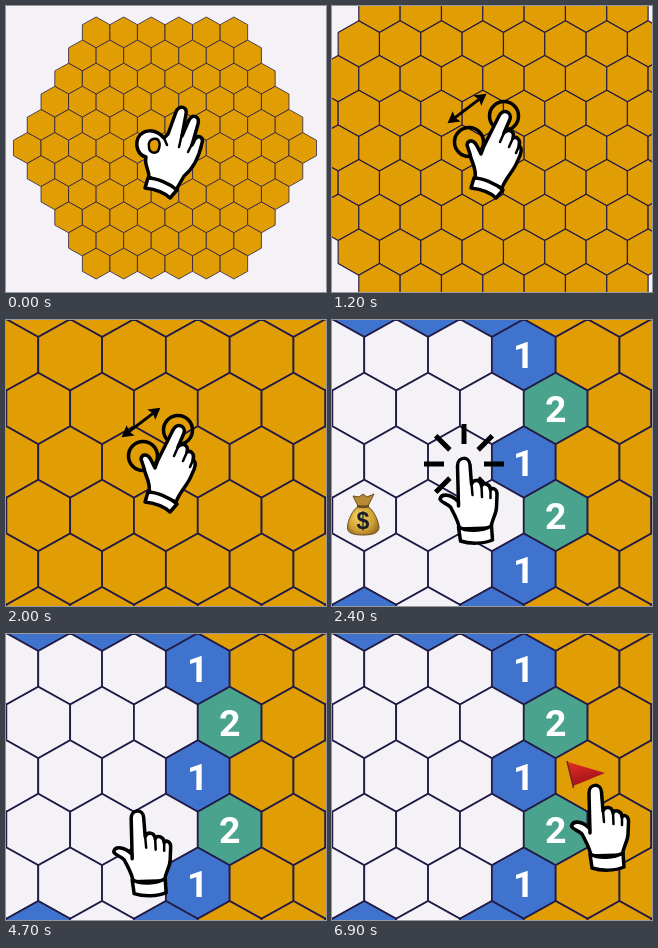
An HTML page with a canvas for the animation above (7000 ms loop, 320 by 286 pixels).

```html
<!DOCTYPE html>
<html lang="en">
<head>
<meta charset="utf-8">
<title>Hexagon minefield tutorial</title>
<style>
  html, body { margin: 0; width: 100%; height: 100%; overflow: hidden; background: #f4f2f6; }
  canvas { display: block; }
</style>
</head>
<body>
<canvas id="stage" width="320" height="286"></canvas>
<script>
const ctx = document.getElementById('stage').getContext('2d');
const LOOP = 7000, STEP = 100;
const PAPER = '#f4f2f6', ORANGE = '#e19d04', BLUE = '#3f73cd', GREEN = '#4aa38c', LINE = '#221b46';
const CELL_W = 27.55, ROW_H = 23.12, RADIUS = ROW_H / 1.5, MAX_ZOOM = 2.316;

const clamp = v => Math.max(0, Math.min(1, v));
const progress = (t, from, to) => clamp((t - from) / (to - from));
const mix = (a, b, p) => a + (b - a) * p;
const during = (t, from, to) => t >= from && t < to;

// Hands: body outline, finger creases, cuff
const POINTER = {
  body: new Path2D('M-5 49 L-6 9 C-6 -1 6 -1 6.5 8 L8 27 C10 22 17 22 18 29 C20 25 27 27 27 33 C29 30 34 32 33.5 38 L33 50 C33 58 28 62 27.5 71 L-4 72 C-5 64 -9 58 -13 50 C-17 46 -22 46 -23.5 42 C-22 36 -12 37 -5 45 Z'),
  creases: new Path2D('M8 27 L9 38 M18 29 L18.5 40 M27 33 L27 41'),
  cuff: new Path2D('M-5 70 C4 75 19 74 28 69 L29 83 C20 87 6 87 -3 84 Z')
};
const WRIST = new Path2D('M142 172 C150 172 163 177 171 184 L164 192 C158 186 147 183 139 182 Z');
const SPREAD = {
  body: new Path2D('M152 140 L167 110 C171 102 180 106 178 113 L172 127 C176 122 183 125 181 132 C185 130 189 134 187 140 C191 142 189 148 186 154 C182 165 174 171 170 182 L143 172 C145 162 139 156 138 148 L135 139 C136 133 142 134 145 140 L149 148 Z'),
  creases: new Path2D('M172 127 L168 136 M181 132 L177 141 M187 140 L184 147'),
  cuff: WRIST
};
const PINCHED = {
  body: new Path2D('M143 171 C143 163 138 159 140 151 C132 149 129 140 132 132 C137 123 149 122 158 132 L162 128 L170 106 C173 98 182 101 180 108 L176 130 L183 114 C187 107 194 111 192 118 L186 139 L189 133 C193 128 198 132 196 137 C193 151 188 162 178 170 L170 184 Z'),
  creases: new Path2D('M176 128 L173 141 M186 138 L182 146 M158 132 L161 139'),
  hole: new Path2D('M147 133 C154 131 155 139 152 145 C149 148 143 147 143 141 C142 137 144 134 147 133 Z'),
  cuff: WRIST
};

function drawHand(hand, x = 0, y = 0) {
  ctx.save();
  ctx.translate(x, y);
  ctx.lineWidth = 3.5;
  ctx.lineJoin = ctx.lineCap = 'round';
  ctx.strokeStyle = '#000';
  for (const part of [hand.body, hand.cuff]) {
    ctx.fillStyle = '#fff';
    ctx.fill(part);
    ctx.stroke(part);
  }
  ctx.lineWidth = 2.5;
  ctx.stroke(hand.creases);
  if (hand.hole) {
    ctx.fillStyle = ORANGE;
    ctx.fill(hand.hole);
    ctx.stroke(hand.hole);
  }
  ctx.restore();
}

function polygon(points) {
  ctx.beginPath();
  points.forEach(([x, y]) => ctx.lineTo(x, y));
  ctx.closePath();
}

// Columns are measured in cell widths from the board centre
function cellState(row, col) {
  const r = Math.abs(row);
  const edge = r % 2 ? 0.5 : 0;
  if (r === 3) {
    if (col > 0) return { fill: ORANGE };
    return { fill: row > 0 && col === -1.5 ? PAPER : BLUE };
  }
  if (r > 3 || col > edge) return { fill: ORANGE };
  if (col < edge) return { fill: PAPER };
  return r % 2 ? { fill: GREEN, label: '2' } : { fill: BLUE, label: '1' };
}

function drawBoard(zoom, revealed) {
  const cx = 159 + 24.9 * (zoom - 1), cy = 142;
  const half = CELL_W * zoom / 2, radius = RADIUS * zoom;
  ctx.strokeStyle = LINE;
  ctx.lineWidth = 0.76 * zoom;
  ctx.lineJoin = 'round';
  ctx.font = 'bold 37.5px Roboto, Arial, sans-serif';
  ctx.textAlign = 'center';
  for (let row = -5; row <= 5; row++) {
    const count = 11 - Math.abs(row);
    for (let i = 0; i < count; i++) {
      const col = i - (count - 1) / 2;
      const x = cx + col * half * 2, y = cy + row * ROW_H * zoom;
      const { fill, label } = revealed ? cellState(row, col) : { fill: ORANGE };
      polygon([[x, y - radius], [x + half, y - radius / 2], [x + half, y + radius / 2],
        [x, y + radius], [x - half, y + radius / 2], [x - half, y - radius / 2]]);
      ctx.fillStyle = fill;
      ctx.fill();
      ctx.stroke();
      if (label) {
        ctx.fillStyle = '#fff';
        ctx.fillText(label, x, y + 13.5);
      }
    }
  }
}

function drawZoomMarks() {
  ctx.strokeStyle = ctx.fillStyle = '#000';
  ctx.lineWidth = 3.5;
  for (const [x, y] of [[172, 110], [137, 136]]) {
    ctx.beginPath();
    ctx.arc(x, y, 14.5, 0, Math.PI * 2);
    ctx.stroke();
  }
  ctx.save();
  ctx.translate(135, 102.5);
  ctx.rotate(Math.atan2(-29, 38));
  ctx.lineWidth = 3;
  ctx.beginPath();
  ctx.moveTo(-18, 0);
  ctx.lineTo(18, 0);
  ctx.stroke();
  for (const side of [-1, 1]) {
    polygon([[side * 24.5, 0], [side * 13, -6.5], [side * 15, 0], [side * 13, 6.5]]);
    ctx.fill();
  }
  ctx.restore();
}

function drawRays(x, y) {
  ctx.strokeStyle = '#000';
  ctx.lineWidth = 5;
  ctx.lineCap = 'butt';
  ctx.beginPath();
  for (let i = 0; i < 8; i++) {
    const dx = Math.cos(i * Math.PI / 4), dy = Math.sin(i * Math.PI / 4);
    ctx.moveTo(x + dx * 20, y + dy * 20);
    ctx.lineTo(x + dx * 40, y + dy * 40);
  }
  ctx.stroke();
}

function drawBag() {
  const shade = ctx.createRadialGradient(26, 196, 2, 31, 200, 20);
  shade.addColorStop(0, '#f0cc5c');
  shade.addColorStop(0.6, '#cfa033');
  shade.addColorStop(1, '#80581c');
  const sack = new Path2D('M27 186 C20 190 16 200 15.5 207 C15 213 21 215 31 215 C41 215 47 213 47 207 C46 200 42 190 35 186 Z');
  const neck = new Path2D('M26 186 L21 176 L27 177 L31 174 L35 177 L42 174 L36 186 Z');
  ctx.lineWidth = 1;
  ctx.strokeStyle = '#6b4c1c';
  ctx.fillStyle = shade;
  ctx.fill(sack);
  ctx.stroke(sack);
  ctx.fillStyle = '#b98a35';
  ctx.fill(neck);
  ctx.stroke(neck);
  ctx.lineWidth = 2.5;
  ctx.stroke(new Path2D('M25 186 Q31 188 37 186'));
  ctx.fillStyle = '#17202a';
  ctx.font = 'bold 23px "Liberation Sans", Arial, sans-serif';
  ctx.fillText('$', 31, 209);
}

function drawFlag() {
  const red = ctx.createLinearGradient(240, 130, 246, 152);
  red.addColorStop(0, '#dc2a24');
  red.addColorStop(1, '#a3131a');
  ctx.fillStyle = red;
  polygon([[236, 128], [273, 139], [241, 152]]);
  ctx.fill();
  ctx.strokeStyle = '#6f2420';
  ctx.lineWidth = 1.5;
  ctx.stroke(new Path2D('M235 127 L241.5 154'));
}

// Pointer legs: start, end, from x, y, to x, y
const LEGS = [
  [2000, 2300, 173, 108, 131.5, 137],
  [3000, 3800, 131.5, 137, 37, 194],
  [4200, 5400, 37, 194, 263, 150]
];

function pointerAt(t) {
  const [start, end, x0, y0, x1, y1] = LEGS.filter(leg => t >= leg[0]).pop();
  const p = progress(t, start, end);
  return [mix(x0, x1, p), mix(y0, y1, p)];
}

function draw(t) {
  ctx.fillStyle = PAPER;
  ctx.fillRect(0, 0, 320, 286);
  const revealed = t >= 2400;
  drawBoard(MAX_ZOOM ** progress(t, 495, 1955), revealed);
  if (revealed && t < 4300) drawBag();
  if (t >= 6000) drawFlag();

  if (t < 400) drawHand(PINCHED);
  else if (t < 2100) {
    drawZoomMarks();
    drawHand(SPREAD);
  } else {
    const [x, y] = pointerAt(t);
    if (during(t, 2300, 2900) || during(t, 3800, 4100) || during(t, 5500, 6500)) drawRays(x + 0.5, y + 7);
    drawHand(POINTER, x, y);
  }
}

function tick() {
  draw(Math.floor(performance.now() % LOOP / STEP) * STEP);
  requestAnimationFrame(tick);
}
tick();
</script>
</body>
</html>
```
